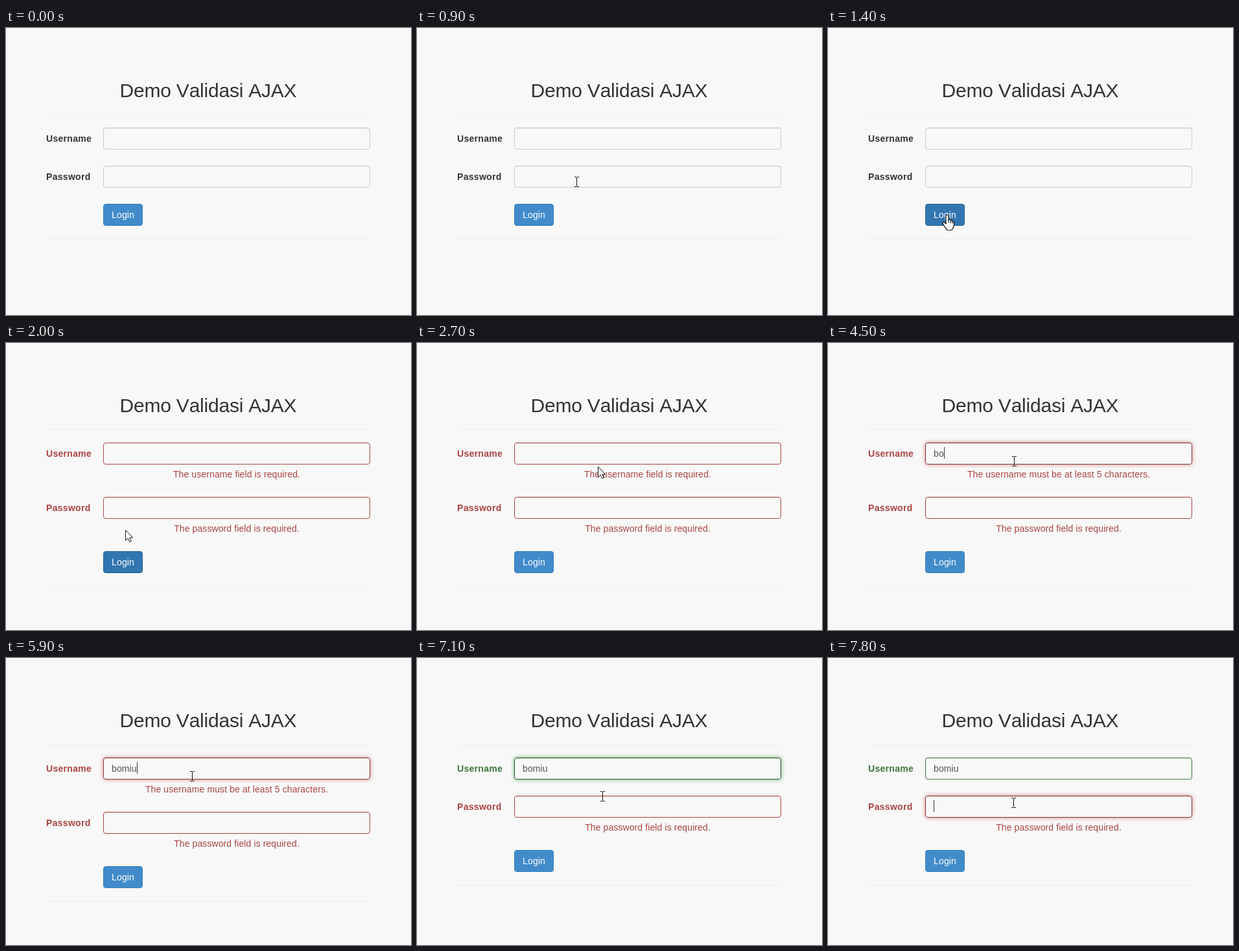
These frames come from a looping animation (625x444 px, 8 s). An HTML page:

```html
<!DOCTYPE html>
<html lang="id">
<head>
<meta charset="utf-8">
<title>Demo Validasi AJAX</title>
<style>
  :root {
    --red: #a94442;
    --green: #3c763d;
    --inset: inset 0 1px 1px rgba(0, 0, 0, .075);
    --flat: var(--inset), 0 0 0 transparent;
    --red-glow: var(--inset), 0 0 6px #ce8483;
    --green-glow: var(--inset), 0 0 6px #67b168;
  }
  * { box-sizing: border-box; }
  html, body { margin: 0; width: 100%; height: 100%; overflow: hidden; background: #f8f8f8; }
  body { position: relative; color: #333; font: 14px/20px "Liberation Sans", Arial, sans-serif; font-kerning: none; letter-spacing: .1px; }
  h2, .row, .foot, .row > *, .foot > *, #cursor { position: absolute; margin: 0; }
  h2 { left: 62px; top: 80px; width: 500px; font-size: 30px; font-weight: 400; line-height: 33px; letter-spacing: -.22px; text-align: center; }
  .line { position: absolute; left: 62px; width: 500px; height: 1px; background: #eee; }
  .row, .foot { left: 0; width: 100%; }
  .row > label { left: 62px; top: 7px; font-weight: 700; letter-spacing: .3px; }
  .field { left: 150px; width: 412px; height: 34px; padding: 6px 12px; border: 1px solid #ccc; border-radius: 4px; color: #555; white-space: pre; }
  .field b { font-weight: 400; letter-spacing: .007em; }
  .caret { position: absolute; top: 6px; width: 1px; height: 18px; background: #333; opacity: 0; }
  .help { left: 150px; top: 39px; width: 412px; color: var(--red); text-align: center; opacity: 0; }
  .button { left: 150px; width: 61px; height: 34px; padding: 6px 0; border: 1px solid #357ebd; border-radius: 4px; background: #428bca; color: #fff; text-align: center; }

  /* hard changes */
  .row > label, .field b, .help, .caret, .button, .foot, #pass, #cursor, #cursor path {
    animation: 8s step-end infinite;
  }
  #user > label { animation-name: user-label; }
  #pass > label { animation-name: pass-label; }
  #required { animation-name: required; }
  #short { animation-name: short; }
  #pass .help { animation-name: pass-help; }
  #user .caret { animation-name: user-caret; }
  #pass .caret { animation-name: pass-caret; }
  #pass { animation-name: pass-shift; }
  .foot { animation-name: foot-shift; }
  .button { animation-name: button; }

  /* eased borders and glows */
  #user .field { animation: user-field 8s infinite; }
  #pass .field { animation: pass-field 8s infinite; }

  /* typed letters */
  .field b:nth-child(1) { animation-name: key1; }
  .field b:nth-child(2) { animation-name: key2; }
  .field b:nth-child(3) { animation-name: key3; }
  .field b:nth-child(4) { animation-name: key4; }
  .field b:nth-child(5) { animation-name: key5; }
  @keyframes key1 { 0% { font-size: 0; } 50%, 100% { font-size: 14px; } }
  @keyframes key2 { 0% { font-size: 0; } 52.5%, 100% { font-size: 14px; } }
  @keyframes key3 { 0% { font-size: 0; } 71.25%, 100% { font-size: 14px; } }
  @keyframes key4 { 0% { font-size: 0; } 72.5%, 100% { font-size: 14px; } }
  @keyframes key5 { 0% { font-size: 0; } 73.75%, 100% { font-size: 14px; } }

  @keyframes user-label { 0% { color: #333; } 23.75% { color: var(--red); } 78.75%, 100% { color: var(--green); } }
  @keyframes pass-label { 0% { color: #333; } 23.75%, 100% { color: var(--red); } }
  @keyframes required { 0%, 56.25%, 100% { opacity: 0; } 23.75% { opacity: 1; } }
  @keyframes short { 0%, 78.75%, 100% { opacity: 0; } 56.25% { opacity: 1; } }
  @keyframes pass-help { 0% { opacity: 0; } 23.75%, 100% { opacity: 1; } }
  @keyframes user-caret { 0%, 46.25%, 62.5%, 80%, 100% { opacity: 0; } 40%, 50%, 68.75% { opacity: 1; } }
  @keyframes pass-caret { 0% { opacity: 0; } 93.75%, 100% { opacity: 1; } }
  @keyframes pass-shift { 0%, 78.75%, 100% { transform: none; } 23.75% { transform: translateY(25px); } }
  @keyframes foot-shift { 0% { transform: none; } 23.75% { transform: translateY(50px); } 78.75%, 100% { transform: translateY(25px); } }
  @keyframes button {
    0%, 30%, 100% { background: #428bca; border-color: #357ebd; box-shadow: none; }
    13.75%, 23.75% { background: #3276b1; border-color: #285e8e; box-shadow: none; }
    21.25% { background: #3276b1; border-color: #285e8e; box-shadow: inset 0 3px 5px rgba(0, 0, 0, .125); }
  }
  @keyframes user-field {
    0%, 23.75% { border-color: #ccc; box-shadow: var(--flat); }
    25.625%, 38.75% { border-color: var(--red); box-shadow: var(--flat); }
    40.625%, 78.75% { border-color: #843534; box-shadow: var(--red-glow); }
    80.625%, 92.5% { border-color: #2b542c; box-shadow: var(--green-glow); }
    94.375%, 100% { border-color: var(--green); box-shadow: var(--flat); }
  }
  @keyframes pass-field {
    0%, 23.75% { border-color: #ccc; box-shadow: var(--flat); }
    25.625%, 92.5% { border-color: var(--red); box-shadow: var(--flat); }
    94.375%, 100% { border-color: #843534; box-shadow: var(--red-glow); }
  }

  /* pointer: hotspot path and shape */
  #cursor { left: 0; top: 0; width: 1px; height: 1px; overflow: visible; animation-name: path; }
  #cursor path { opacity: 0; stroke: #111; fill: #fff; stroke-linejoin: round; }
  #cursor #arrow { animation-name: arrow; }
  #cursor #hand { animation-name: hand; stroke-width: 1.2; }
  #cursor #beam { animation-name: beam; }
  @keyframes path {
    0% { transform: translate(660px, 50px); }
    5% { transform: translate(595px, 70px); }
    6.25% { transform: translate(546px, 92px); }
    7.5% { transform: translate(476px, 121px); }
    8.75% { transform: translate(404px, 153px); }
    10% { transform: translate(284px, 197px); }
    11.25% { transform: translate(246px, 238px); }
    12.5% { transform: translate(209px, 271px); }
    13.75% { transform: translate(196px, 284px); }
    15% { transform: translate(191px, 287px); }
    16.25% { transform: translate(187px, 288px); }
    17.5% { transform: translate(184px, 289px); }
    30% { transform: translate(200px, 281px); }
    31.25% { transform: translate(241px, 246px); }
    32.5% { transform: translate(265px, 213px); }
    33.75% { transform: translate(279px, 191px); }
    35% { transform: translate(287px, 183px); }
    86.25% { transform: translate(287px, 186px); }
    87.5% { transform: translate(286px, 199px); }
    88.75% { transform: translate(286px, 214px); }
    90% { transform: translate(286px, 221px); }
    91.25% { transform: translate(286px, 225px); }
    97.5%, 100% { transform: translate(286px, 224px); }
  }
  @keyframes arrow {
    0%, 11.25%, 13.75%, 31.25%, 35%, 88.75%, 100% { opacity: 0; }
    5%, 12.5%, 25%, 32.5%, 87.5% { opacity: 1; }
  }
  @keyframes hand { 0%, 25%, 100% { opacity: 0; } 13.75% { opacity: 1; } }
  @keyframes beam {
    0%, 12.5%, 32.5%, 87.5% { opacity: 0; }
    11.25%, 31.25%, 35%, 88.75%, 100% { opacity: 1; }
  }
</style>
</head>
<body>
  <h2>Demo Validasi AJAX</h2>
  <div class="line" style="top:133px"></div>

  <div class="row" id="user" style="top:154px">
    <label>Username</label>
    <div class="field"><b>b</b><b>o</b><b>m</b><b>i</b><b>u</b><i class="caret"></i></div>
    <div class="help" id="required">The username field is required.</div>
    <div class="help" id="short">The username must be at least 5 characters.</div>
  </div>

  <div class="row" id="pass" style="top:213px">
    <label>Password</label>
    <div class="field"><i class="caret"></i></div>
    <div class="help">The password field is required.</div>
  </div>

  <div class="foot" style="top:272px">
    <div class="button">Login</div>
    <div class="line" style="top:54px"></div>
  </div>

  <svg id="cursor">
    <path id="arrow" d="M.5 .5V16.5L4.2 13L6.8 18.7L9.3 17.6L6.8 12H11.8Z"/>
    <path id="hand" d="M-2 14V2A2 2 0 0 1 2 2V8.5A1.8 1.8 0 0 1 5.4 9.2A1.7 1.7 0 0 1 8.3 10.2A1.4 1.4 0 0 1 10.4 11.5V16C10.4 19 9 21 7.5 23Q3 25 -1 23C-2 20.5 -5 17.5 -6.8 13.8C-7.6 11.6 -5 10.8 -4 12ZM2 8.5V12M5.4 9.5V13M8.3 10.5V13.5"/>
    <path id="beam" d="M-3 -7.5H0M1 -7.5H4M.5 -7V7M-3 7.5H0M1 7.5H4"/>
  </svg>
</body>
</html>
```
